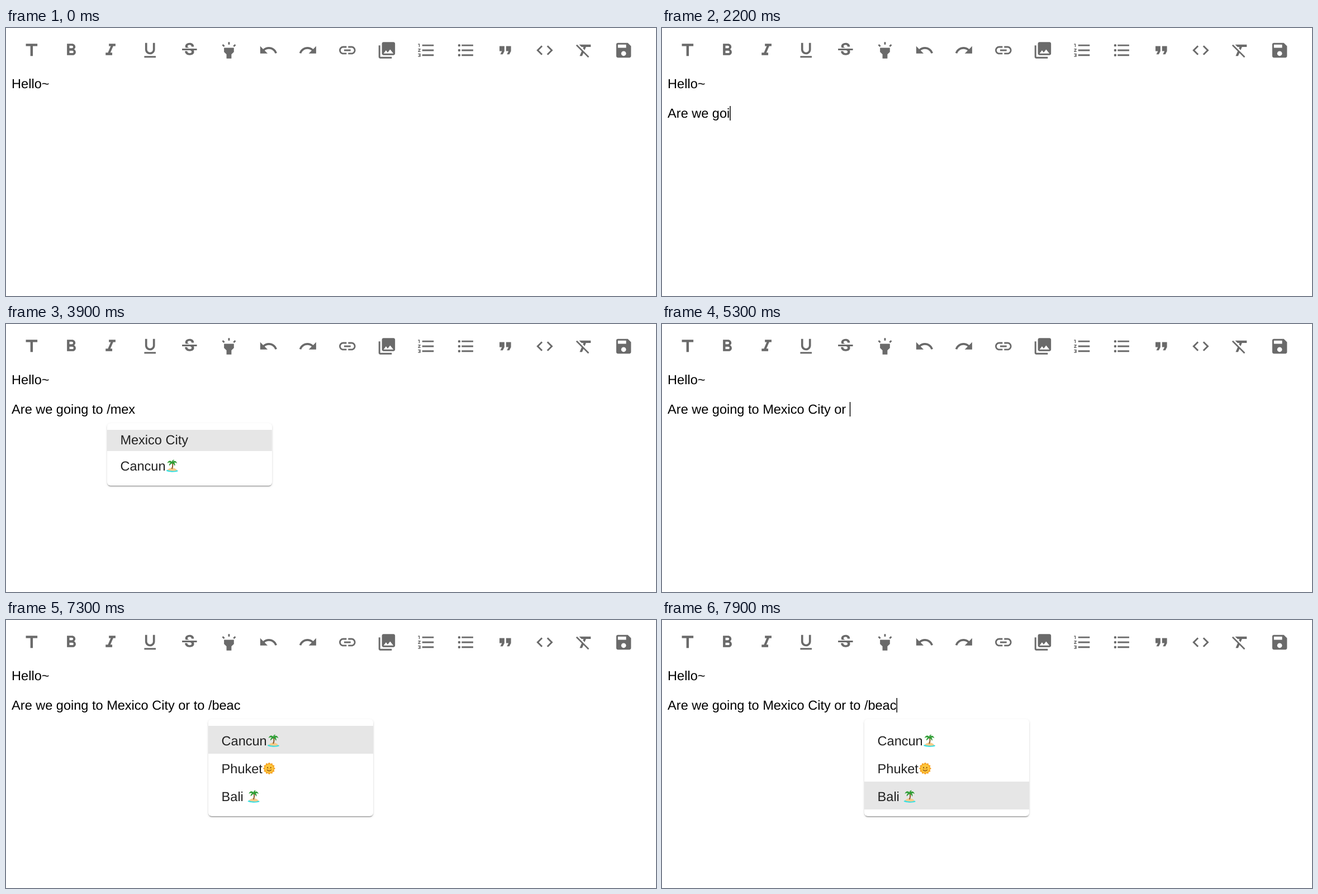
Write an HTML page that moves like this. It is 1163 px wide and 481 px high and loops after 8000 ms.

```html
<!DOCTYPE html>
<html lang="en">
<head>
<meta charset="utf-8">
<title>Editor with autocomplete</title>
<style>
html, body { margin: 0; width: 100%; height: 100%; overflow: hidden; background: #fff; }
svg, .paper { position: absolute; }
svg { left: 0; top: 0; width: 1163px; height: 481px; }
text {
  font: 23.54px "Liberation Sans", Arial, sans-serif;
  font-kerning: none;
  text-rendering: geometricPrecision;
  white-space: pre;
}
#icons { fill: #6a6a6a; }
.menu text { fill: #212121; }
.row { fill: #e6e6e6; }
.paper {
  top: 178px;
  width: 295px;
  border-radius: 6px;
  background: #fff;
  box-shadow: 0 3px 1.5px -1.5px rgba(0,0,0,.2), 0 1.5px 1.5px rgba(0,0,0,.14), 0 1.5px 4.4px rgba(0,0,0,.12);
}
</style>
</head>
<body>
<svg id="stage" viewBox="0 0 1163 481">
  <defs>
    <symbol id="island" viewBox="0 0 24 24">
      <path fill="#35dfe3" d="M1 21C3 18.500 7 18.500 11.500 18.500S20 18.500 22.500 21.500C19 23.800 5 23.800 1 21z"/>
      <path fill="#f6cb8b" d="M3.500 19.500C6 16.500 9 15.500 12 15.500S18.500 17 20.500 20C16 21.800 8 21.600 3.500 19.500z"/>
      <path fill="none" stroke="#8a5a2b" stroke-width="2" d="M11.500 5.500C13.300 9 13.200 13 11.300 17.500"/>
      <path fill="#2f9e35" d="M11.500 5C8 1.500 4.500 3 3 7.500C6 5.500 8 6 9 6.500C6.500 7.800 6 10 6.500 12C8.500 9.500 10 8.500 11.800 7.500C14 8.500 15.500 10 16.500 12.500C17.500 10 17 8 15.500 6.500C17.500 6 19 6.500 20.500 8C20 4 16.500 2.300 13.500 4C14 2.500 15 2 16 1.600C13.500.3 11.600 2 11.500 5z"/>
    </symbol>
    <symbol id="sun" viewBox="0 0 24 24">
      <path id="rays" fill="#f6a11f"/>
      <circle cx="12" cy="12" r="7.800" fill="#fdc63c"/>
      <g fill="#8a4a12">
        <ellipse cx="9.200" cy="10.600" rx="1" ry="1.400"/>
        <ellipse cx="14.800" cy="10.600" rx="1" ry="1.400"/>
      </g>
      <path d="M8.300 14.500Q12 18 15.700 14.500" fill="none" stroke="#8a4a12" stroke-width="1.200" stroke-linecap="round"/>
      <path d="M10.800 12.600Q12 13.800 13.200 12.600" fill="none" stroke="#e08a1c"/>
    </symbol>
  </defs>
  <g id="icons">
    <path d="M5 4v3h5.500v12h3V7H19V4z"/>
    <path d="M15.600 10.790c.97-.67 1.650-1.770 1.650-2.790 0-2.260-1.750-4-4-4H7v14h7.040c2.090 0 3.710-1.700 3.710-3.790 0-1.520-.86-2.820-2.150-3.420zM10 6.500h3c.83 0 1.500.67 1.500 1.500s-.67 1.500-1.500 1.500h-3v-3zm3.500 9H10v-3h3.500c.83 0 1.500.67 1.500 1.500s-.67 1.500-1.500 1.500z"/>
    <path d="M10 4v3h2.210l-3.420 8H6v3h8v-3h-2.210l3.420-8H18V4z"/>
    <path d="M12 17c3.310 0 6-2.690 6-6V3h-2.500v8c0 1.930-1.570 3.500-3.500 3.500S8.500 12.930 8.500 11V3H6v8c0 3.310 2.690 6 6 6zm-7 2v2h14v-2H5z"/>
    <path d="M3 10h18v2H3zM7.240 8.750C6.600 7.500 6.750 6.200 7.250 5.400C8.100 3.900 10 3 12.240 3C15.200 3 17.400 4.700 17.400 7.530h-3.010C14.400 6 13.500 5.400 12 5.400C10.500 5.400 9.650 6.100 9.650 7.100C9.650 8.100 10.600 8.600 11.800 9H7.390zM12.600 12C14 12.500 14.600 13 14.600 13.970C14.600 15 13.700 15.640 12.300 15.640C10.500 15.640 9.360 14.800 9.360 13.100H6.400C6.400 16.300 9 18 12.300 18C15.500 18 17.600 16.500 17.600 13.950c0-.9-.2-1.500-.48-1.950z"/>
    <path d="M6 14l3 3v5h6v-5l3-3V9H6zm5-12h2v3h-2zM3.500 5.880l1.410-1.410 2.120 2.120L5.620 8zm13.460.71l2.120-2.120 1.410 1.410L18.380 8z"/>
    <path d="M12.500 8c-2.650 0-5.050.99-6.900 2.600L2 7v9h9l-3.620-3.620c1.390-1.160 3.160-1.880 5.120-1.880 3.540 0 6.550 2.310 7.600 5.500l2.370-.78C21.080 11.030 17.150 8 12.500 8z"/>
    <path d="M18.400 10.600C16.550 8.990 14.150 8 11.500 8c-4.650 0-8.580 3.030-9.960 7.220L3.900 16c1.050-3.190 4.050-5.500 7.600-5.500 1.950 0 3.730.72 5.120 1.880L13 16h9V7l-3.600 3.600z"/>
    <path d="M3.900 12c0-1.710 1.390-3.100 3.100-3.100h4V7H7c-2.760 0-5 2.240-5 5s2.240 5 5 5h4v-1.900H7c-1.710 0-3.100-1.390-3.100-3.100zM8 13h8v-2H8v2zm9-6h-4v1.900h4c1.710 0 3.100 1.390 3.100 3.100s-1.390 3.100-3.100 3.100h-4V17h4c2.760 0 5-2.240 5-5s-2.240-5-5-5z"/>
    <path d="M22 16V4c0-1.100-.9-2-2-2H8c-1.100 0-2 .9-2 2v12c0 1.100.9 2 2 2h12c1.100 0 2-.9 2-2zm-11-4l2.030 2.710L16 11l4 5H8l3-4zM2 6v14c0 1.100.9 2 2 2h14v-2H4V6H2z"/>
    <path d="M2 17h2v.5H3v1h1v.5H2v1h3v-4H2v1zm1-9h1V4H2v1h1v3zm-1 3h1.800L2 13.100v.9h3v-1H3.200L5 10.900V10H2v1zm5-6v2h14V5H7zm0 14h14v-2H7v2zm0-6h14v-2H7v2z"/>
    <path d="M2.500 6a1.500 1.500 0 1 0 3 0a1.500 1.500 0 1 0-3 0zm0 6a1.500 1.500 0 1 0 3 0a1.500 1.500 0 1 0-3 0zm0 6a1.500 1.500 0 1 0 3 0a1.500 1.500 0 1 0-3 0zM7 19h14v-2H7v2zm0-6h14v-2H7v2zm0-8v2h14V5H7z"/>
    <path d="M6 17h3l2-4V7H5v6h3zm8 0h3l2-4V7h-6v6h3z"/>
    <path d="M9.400 16.600L4.800 12l4.600-4.600L8 6l-6 6 6 6 1.400-1.400zm5.200 0l4.600-4.600-4.600-4.600L16 6l6 6-6 6-1.400-1.400z"/>
    <path d="M3.270 5L2 6.270l6.970 6.970L6.500 19h3l1.570-3.660L16.730 21 18 19.730 3.550 5.270 3.270 5zM6 5v.18L8.820 8h2.400l-.72 1.680 2.100 2.100L14.210 8H20V5H6z"/>
    <path d="M17 3H5c-1.110 0-2 .9-2 2v14c0 1.100.89 2 2 2h14c1.100 0 2-.9 2-2V7l-4-4zm-5 16c-1.660 0-3-1.340-3-3s1.340-3 3-3 3 1.340 3 3-1.340 3-3 3zm3-10H5V5h10v4z"/>
  </g>
  <text x="10.100" y="107.500">Hello~</text>
  <text id="line" x="10.100" y="160.500" xml:space="preserve"></text>
  <rect id="caret" y="140" width="1.470" height="26"/>
</svg>
<script>
const LOOP = 8000, LEFT = 10.1, SCALE = 1.4712;
const $ = id => document.getElementById(id);
const stage = $('stage'), line = $('line'), caret = $('caret');

function add(parent, tag, attrs, text) {
  const el = document.createElementNS('http://www.w3.org/2000/svg', tag);
  for (const k in attrs) el.setAttribute(k, attrs[k]);
  if (text) el.textContent = text;
  parent.appendChild(el);
  return el;
}

[...$('icons').children].forEach((icon, i) => {
  icon.setAttribute('transform', `translate(${28.2 + i * 48 * SCALE} 22.3) scale(${SCALE})`);
});

// Twelve-pointed star behind the sun's face
$('rays').setAttribute('d', 'M' + Array.from({ length: 24 }, (_, i) => {
  const a = i * Math.PI / 12, r = i % 2 ? 8.8 : 11;
  return (12 + r * Math.cos(a)).toFixed(2) + ' ' + (12 + r * Math.sin(a)).toFixed(2);
}).join('L') + 'z');

function makeMenu(x, items) {
  const paper = document.createElement('div');
  const group = add(stage, 'g', { class: 'menu' });
  let top = 190;
  const rows = items.map(([label, emoji]) => {
    const h = emoji ? 50 : 38, base = top + h * 0.75 - 2.1;
    const row = add(group, 'rect', { class: 'row', x, y: top, width: 295, height: h });
    const text = add(group, 'text', { x: x + 23.6, y: base, 'xml:space': 'preserve' }, label);
    if (emoji) {
      add(group, 'use', {
        href: '#' + emoji, width: 24, height: 24, y: base - 20.9,
        x: x + 23.6 + text.getComputedTextLength()
      });
    }
    top += h;
    return row;
  });
  paper.className = 'paper';
  paper.style.left = x + 'px';
  paper.style.height = top + 12 - 178 + 'px';
  document.body.insertBefore(paper, stage);
  return { paper, group, rows };
}

const menus = {
  city: makeMenu(180.8, [['Mexico City'], ['Cancun', 'island']]),
  beach: makeMenu(362, [['Cancun', 'island'], ['Phuket', 'sun'], ['Bali ', 'island']])
};

// [time, text, caret, menu, highlighted row]
const steps = [[0, '', 0], [600, '', 1]];
const type = (start, ...pairs) => {
  for (const [t, s, menu] of pairs) steps.push([t, start + s, 1, menu, 0]);
};
type('', [1000, 'A'], [1100, 'Ar'], [1300, 'Are'], [1400, 'Are w'], [1600, 'Are we'], [1700, 'Are we ']);
type('Are we ', [1900, 'g'], [2000, 'go'], [2200, 'goi'], [2300, 'goin'], [2400, 'going'],
  [2500, 'going '], [2600, 'going t'], [2700, 'going to ']);
const going = 'Are we going to ';
type(going, [2900, '/'], [3100, '/m'], [3200, '/m', 'city'], [3300, '/me', 'city'], [3400, '/mex', 'city']);
steps.push([3900, going + '/mex', 0, 'city', 0]);
const city = going + 'Mexico City';
type(city, [4300, ''], [4800, ' '], [5000, ' o'], [5100, ' or'], [5300, ' or '],
  [5500, ' or t'], [5600, ' or to'], [5700, ' or to ']);
const to = city + ' or to ';
type(to, [6100, '/'], [6300, '/b'], [6400, '/b', 'beach'], [6500, '/be', 'beach'],
  [6600, '/bea', 'beach'], [6700, '/beac', 'beach']);
for (const [t, on, row] of [[7200, 0, 0], [7400, 0, 0.5], [7500, 0, 1], [7700, 1, 1], [7800, 1, 1.5], [7900, 1, 2]])
  steps.push([t, to + '/beac', on, 'beach', row]);

let shown;
function show(step) {
  if (step === shown) return;
  shown = step;
  const [, text, on, open, row] = step;
  line.textContent = text;
  caret.setAttribute('x', LEFT + (text ? line.getComputedTextLength() : 0));
  caret.style.visibility = on ? 'visible' : 'hidden';
  for (const name in menus) {
    const { paper, group, rows } = menus[name];
    paper.style.visibility = group.style.visibility = name === open ? 'visible' : 'hidden';
    rows.forEach((r, i) => { r.style.opacity = Math.max(0, 1 - Math.abs(row - i)); });
  }
}

const start = performance.now();
function tick() {
  const t = (performance.now() - start) % LOOP;
  show(steps.filter(s => s[0] <= t).pop());
  requestAnimationFrame(tick);
}
tick();
</script>
</body>
</html>
```
